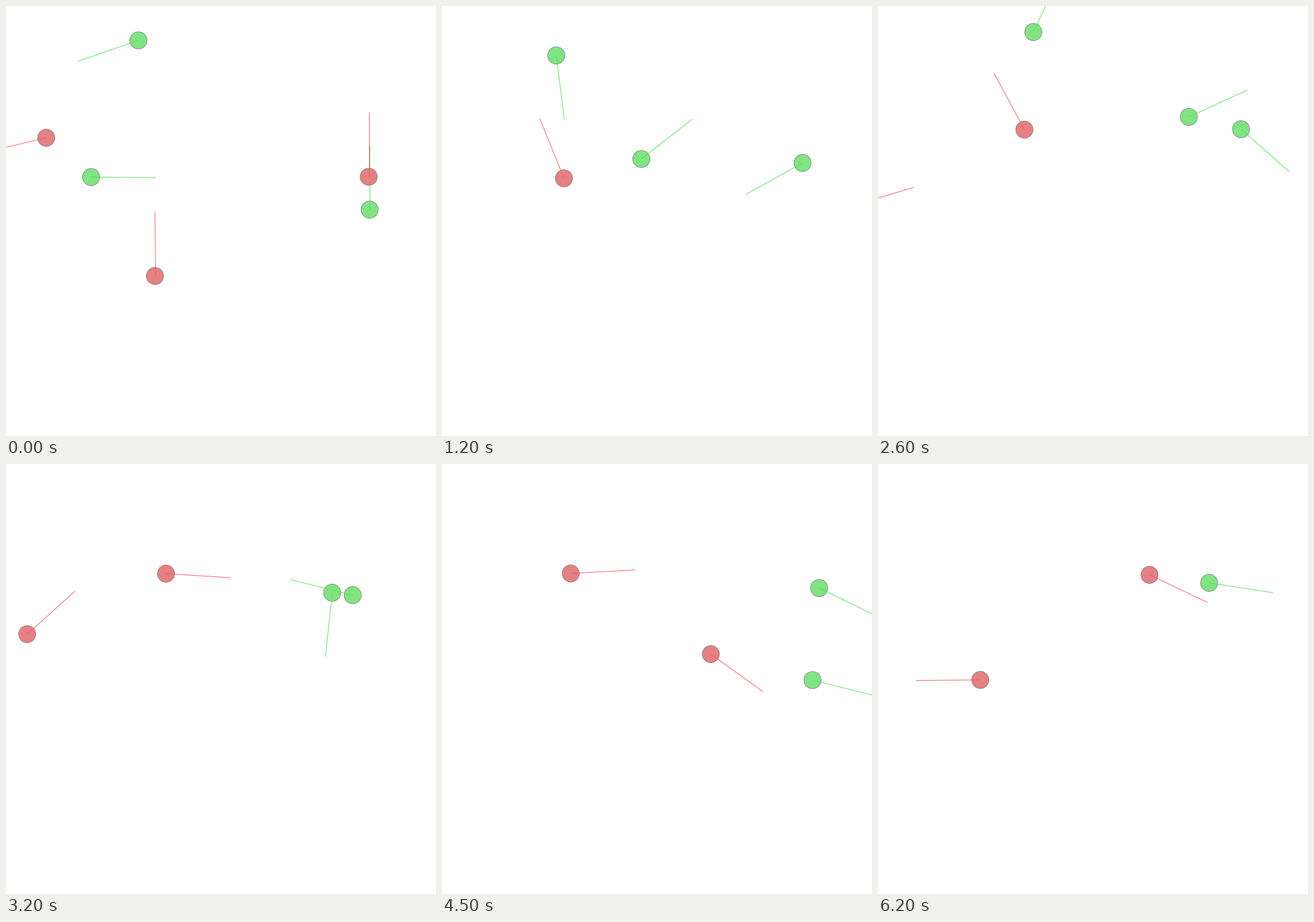
A matplotlib script that plays this animation: 700x700 px, repeating every 6300 ms.

```python
import numpy as np
import matplotlib.pyplot as plt
from matplotlib.animation import FuncAnimation
from matplotlib.patches import Circle

SIZE, DPI = 700, 100
FRAMES, INTERVAL = 63, 100
LAST = FRAMES - 1
RADIUS, REACH = 14, 105
CRUISE = 18  # pixels per frame when passing a pose
PX = 72 / DPI  # one pixel in points

GREEN = ("#80e482", "#5ee05e")
RED = ("#e58083", "#ee6066")

fig = plt.figure(figsize=(SIZE / DPI, SIZE / DPI), dpi=DPI, facecolor="white")
ax = fig.add_axes([0, 0, 1, 1])
ax.set_xlim(0, SIZE)
ax.set_ylim(SIZE, 0)
ax.axis("off")


def unit(degrees):
    a = np.radians(degrees)
    return np.array([np.cos(a), np.sin(a)])


def hermite(p0, p1, v0, v1, s):
    """Point and slope at s in 0..1 on a cubic with given ends and end slopes."""
    a = 2 * (p0 - p1) + v0 + v1
    b = 3 * (p1 - p0) - 2 * v0 - v1
    point = ((a * s + b) * s + v0) * s + p0
    slope = (3 * a * s + 2 * b) * s + v0
    return point, slope


class Robot:
    """Drives smoothly through (time, x, y, heading) poses; its line looks ahead."""

    def __init__(self, colors, *poses):
        fill, stroke = colors
        layer = 4 if colors is RED else 2
        self.poses = poses
        self.disc = ax.add_patch(Circle((0, 0), RADIUS, fc=fill, ec="#858585",
                                        lw=0.9 * PX, zorder=layer))
        self.line, = ax.plot([], [], color=stroke, lw=PX, zorder=layer + 1,
                             solid_capstyle="butt")

    def locate(self, t):
        for start, stop in zip(self.poses, self.poses[1:]):
            if t <= stop[0]:
                break
        (t0, *p0, h0), (t1, *p1, h1) = start, stop
        push = CRUISE * (t1 - t0)
        return hermite(np.array(p0), np.array(p1), push * unit(h0),
                       push * unit(h1), (t - t0) / (t1 - t0))

    def place(self, t):
        end = self.poses[-1][0]
        seen = t < end or end == LAST
        self.disc.set_visible(seen)
        self.line.set_visible(seen)
        if seen:
            center, slope = self.locate(t)
            center = center + 0.5
            tip = center + REACH * slope / np.hypot(*slope)
            self.disc.center = center
            self.line.set_data(*zip(center, tip))


robots = [
    # turns around outside the left edge
    Robot(RED, (0, 65, 214, 166.6), (16, -150, 270, 60), (32, 34, 276.5, 318),
          (40, 99.5, 199, 333.3), (51, 349.5, 176, 358.4), (LAST, 441.5, 180, 25.4)),
    Robot(RED, (0, 242, 439, 270), (12, 198, 280, 248), (20, 215.5, 226.5, 0.5),
          (32, 260, 178, 3.6), (40, 365.5, 258.5, 40.4), (51, 433, 343, 171.3),
          (LAST, 166, 351, 179.5)),
    Robot(RED, (0, 590, 277.5, 270), (12, 590, 14, 270)),
    # leaves through the top
    Robot(GREEN, (0, 215, 55.5, 161), (12, 185.5, 80, 82.8), (20, 188, 77.5, 10.5),
          (29, 270, -4, 290)),
    # leaves through the right edge
    Robot(GREEN, (0, 138, 278, 0.5), (12, 324, 248.5, 322), (20, 422, 216, 348),
          (32, 530.5, 209, 96), (40, 520, 297, 71.3), (49, 690, 364, 4)),
    Robot(GREEN, (0, 591.5, 331, 270), (12, 586.5, 255, 151), (20, 566.5, 228, 268),
          (32, 564, 213, 194), (40, 556, 202.5, 340.5), (51, 590, 189, 218.2),
          (LAST, 538.5, 193, 8.7)),
]


def draw(frame):
    for robot in robots:
        robot.place(frame)


anim = FuncAnimation(fig, draw, frames=FRAMES, interval=INTERVAL,
                     repeat=True, repeat_delay=0, blit=False)
plt.show()
```
